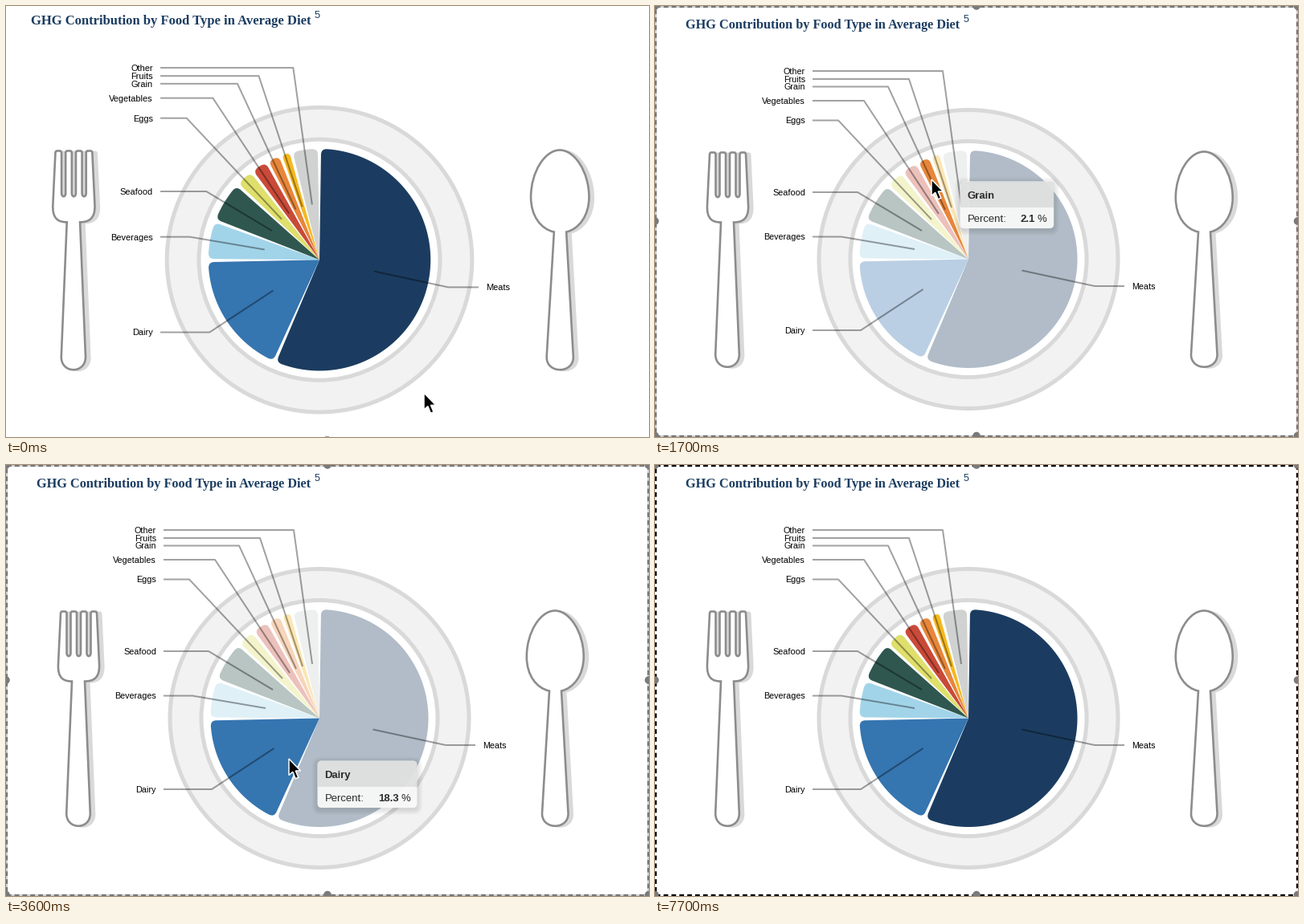
Animation of 800 by 537 pixels, one loop 7800 ms. Source, as a matplotlib script:

```python
import numpy as np
import matplotlib.pyplot as plt
from matplotlib.animation import FuncAnimation
from matplotlib.patches import Circle, FancyBboxPatch, PathPatch, Polygon, Rectangle
from matplotlib.path import Path
from matplotlib.transforms import Affine2D

W, H, DPI = 800, 537, 100
PX = 72 / DPI
FRAMES, STEP = 78, 100
ZOOM = 0.98
CX, CY, R = 390, 315.5, 135.5
GAP = 0.85
DIM = 0.34
NAVY = "#1b3c60"

# name, percent, colour, connector: label end, elbow, slice end
SLICES = [
    ("Meats", 56.6, NAVY, [(584, 349), (547, 349), (456.5, 329.5)]),
    ("Dairy", 18.3, "#3575b0", [(196, 404), (256, 404), (333.5, 353)]),
    ("Beverages", 5.8, "#a2d4e9", [(196, 287.5), (232, 287.5), (323, 303)]),
    ("Seafood", 6.1, "#2f5750", [(196, 232), (252, 232), (332, 280)]),
    ("Eggs", 2.8, "#dfdf6b", [(196, 142.5), (228, 142.5), (344, 266)]),
    ("Vegetables", 2.6, "#c94a38", [(196, 118), (260, 118), (353, 259)]),
    ("Grain", 2.1, "#e8863a", [(196, 100.5), (290, 100.5), (361, 254)]),
    ("Fruits", 1.6, "#f5b820", [(196, 91), (316, 91), (369, 251)]),
    ("Other", 4.1, "#d0d2d2", [(196, 81), (358, 81), (381, 248)]),
]
EDGES = np.concatenate([[0], np.cumsum([s[1] for s in SLICES])]) * 3.6

# pointer path: time in ms, x, y
POINTER = np.array([
    (0, 517.4, 478), (300, 500, 440), (600, 440, 300), (900, 408, 222),
    (1200, 399, 217), (1400, 378, 214), (1600, 354, 212), (1800, 334, 220),
    (2000, 313, 232), (2200, 315, 246), (2300, 296, 258), (2400, 284, 293),
    (2500, 290, 326), (2800, 310, 339), (3300, 336, 352), (3600, 352, 366),
    (4000, 332, 362), (4400, 344, 354), (4700, 357, 366), (5000, 430, 370),
    (5200, 466, 376), (5400, 535, 390), (5600, 577, 398), (5900, 466, 378),
    (6200, 440, 372), (6500, 480, 410), (6700, 550, 470), (7000, 620, 550),
    (7800, 620, 550),
])
BLACK_BORDER_FROM = 7000

fig = plt.figure(figsize=(W / DPI, H / DPI), dpi=DPI, facecolor="white")
ax = fig.add_axes([0, 0, 1, 1])
ax.axis("off")
texts = []


def shape(start, *segs):
    """Path from segments of 1 (line), 2 (quadratic) or 3 (cubic) points."""
    pts, codes = [start], [Path.MOVETO]
    kinds = {1: Path.LINETO, 2: Path.CURVE3, 3: Path.CURVE4}
    for seg in segs:
        pts += seg
        codes += [kinds[len(seg)]] * len(seg)
    return Path(pts + [start], codes + [Path.CLOSEPOLY])


def label(x, y, s, size, z=6, **kw):
    t = ax.text(x, y, s, fontsize=size * PX, va="baseline", zorder=z, **kw)
    texts.append((t, size * PX))
    return t


def polar(deg, r):
    a = np.radians(deg)
    return CX + r * np.sin(a), CY - r * np.cos(a)


def wedge(a0, a1):
    a0, a1 = a0 + GAP, a1 - GAP
    c = min(7, np.radians(a1 - a0) * R * 0.47)
    d = np.degrees(c / R)
    arc = [[polar(a, R)] for a in np.linspace(a0 + d, a1 - d, 90)]
    return shape((CX, CY), [polar(a0, R - c)], [polar(a0, R), arc[0][0]], *arc,
                 [polar(a1, R), polar(a1, R - c)])


def utensil(path):
    shadow = path.transformed(Affine2D().translate(5.5, 1))
    ax.add_patch(PathPatch(shadow, fc="#d9d9d9", ec="#d9d9d9", lw=2 * PX))
    ax.add_patch(PathPatch(path, fc="white", ec="#8c8c8c", lw=2.6 * PX))


def fork():
    segs = []
    for x in (68, 80.5, 93, 105.5):
        segs += [[(x, 182.5), (x + 2, 182.5)], [(x + 5.5, 182.5)],
                 [(x + 7.5, 182.5), (x + 7.5, 185)]]
        if x < 105:
            segs += [[(x + 7.5, 234)],
                     [(x + 7.5, 239.5), (x + 12.5, 239.5), (x + 12.5, 234)],
                     [(x + 12.5, 185)]]
    return shape((68, 185), *segs,
                 [(116, 248)], [(117, 266), (108, 269.5), (98, 269.5)],
                 [(104.8, 434)], [(105, 455), (75, 455), (75.2, 434)],
                 [(82, 269.5)], [(72, 269.5), (64, 266), (65, 248)])


def spoon():
    return shape((676, 281.5),
                 [(660, 278), (647.8, 262), (647.8, 239)],
                 [(647.8, 208), (665, 181.5), (683, 181.5)],
                 [(701, 181.5), (718.7, 208), (718.7, 239)],
                 [(718.7, 262), (706, 278), (691, 281.5)],
                 [(699.5, 434)], [(700, 455), (666.5, 455), (667, 434)])


# heading
label(38, 28, "GHG Contribution by Food Type in Average Diet", 16.3,
      family="Liberation Serif", weight="bold", color=NAVY)
label(384, 20, "5", 12.5, family="Liberation Sans", color=NAVY)

# plate and cutlery
ax.add_patch(Circle((CX, CY), 186, fc="#f2f2f2", ec="#d9d9d9", lw=5 * PX))
ax.add_patch(Circle((CX, CY), 147, fc="white", ec="#d9d9d9", lw=5 * PX))
utensil(fork())
utensil(spoon())

# pie, connectors and labels
wedges = []
for i, (name, share, color, line) in enumerate(SLICES):
    patch = PathPatch(wedge(EDGES[i], EDGES[i + 1]), fc=color, lw=0, zorder=3)
    wedges.append(ax.add_patch(patch))
    ax.plot(*zip(*line), color="black", alpha=0.37, lw=2 * PX, zorder=4,
            solid_joinstyle="round", solid_capstyle="butt")
    x, y = line[0]
    side = 1 if x > CX else -1
    label(x + 9 * side, y + 3.8, name, 10.8, family="Liberation Sans",
          ha="left" if side > 0 else "right", color="black")

# selection border
border = []
box = (0.5, 0.5), 798.5, 535
base = ax.add_patch(Rectangle(*box, fill=False, lw=2 * PX, zorder=7))
dash = ax.add_patch(Rectangle(*box, fill=False, lw=2.4 * PX, zorder=8,
                              ls=(0, (2.4, 1.7))))
border += [base, dash]
for hx in (0, 400, 799.5):
    for hy in (0, 268, 535.5):
        if (hx, hy) != (400, 268):
            border.append(ax.add_patch(
                Circle((hx, hy), 4.8, fc="#7a7a7a", lw=0, zorder=9)))
mark = ax.add_patch(Rectangle((396.8, 530.4), 5, 1.3, fc="#9a9a9a", lw=0))

# tooltip
tip_shift = Affine2D()
tip_move = tip_shift + ax.transData
tip = []


def rounded(x, y, w, h, r, z, **kw):
    p = FancyBboxPatch((x, y), w, h, boxstyle=f"round,pad=0,rounding_size={r}",
                       lw=0, zorder=z, transform=tip_move, **kw)
    tip.append(ax.add_patch(p))
    return p


def tip_text(x, y, **kw):
    t = label(x, y, "", 13.1, z=13, family="Liberation Sans", color="#2b2b2b", **kw)
    t.set_transform(tip_move)
    tip.append(t)
    return t


shadows = [rounded(-g, 2 - g, 124 + 2 * g, 58.5 + 2 * g, 5 + g, 10,
                   fc="black", alpha=0.016) for g in range(1, 8)]
body = rounded(0, 0, 124, 58.5, 5, 11, fc="#fafafa", alpha=0.95)
head = Rectangle((0, 0), 124, 32, fc="black", alpha=0.09, lw=0, zorder=12,
                 transform=tip_move)
ax.add_patch(head)
head.set_clip_path(body)
tip.append(head)
tip_name = tip_text(9, 21.5, weight="bold")
tip_key = tip_text(9, 50.5)
tip_key.set_text("Percent:")
tip_value = tip_text(101, 50.5, weight="bold", ha="right")
tip_unit = tip_text(115.5, 50.5, ha="right")
tip_unit.set_text("%")

# pointer
ptr_shift = Affine2D()
pointer = ax.add_patch(Polygon(
    [(0, 0), (0, 20.5), (4.7, 16.3), (8.2, 24.8), (11.8, 23.3), (8.3, 15), (14.5, 15)],
    fc="black", ec="white", lw=1.5 * PX, zorder=15,
    transform=ptr_shift + ax.transData))


def hit(x, y):
    """Index of the slice under a point, or None."""
    if np.hypot(x - CX, y - CY) > R:
        return None
    a = np.degrees(np.arctan2(x - CX, CY - y)) % 360
    i = int(np.searchsorted(EDGES, a, side="right")) - 1
    i = min(i, len(SLICES) - 1)
    return i if EDGES[i] + GAP < a < EDGES[i + 1] - GAP else None


def set_view(zoomed):
    """Opening view is slightly closer and has no selection border."""
    k = ZOOM if zoomed else 1
    x0, y0 = (CX * (1 - ZOOM), 5.6) if zoomed else (0, 0)
    ax.set_xlim(x0, x0 + W * k)
    ax.set_ylim(y0 + H * k, y0)
    for t, size in texts:
        t.set_fontsize(size / k)
    for p in border:
        p.set_visible(not zoomed)
    mark.set_visible(zoomed)


def show_tip(i, x, y):
    for a in tip:
        a.set_visible(i is not None)
    if i is None:
        return
    name, share = SLICES[i][:2]
    narrow = 0 if share >= 10 else 7.3
    tip_shift.clear().translate(x + 35.5, y + 2.5)
    for g, p in enumerate(shadows, 1):
        p.set_width(124 - narrow + 2 * g)
    body.set_width(124 - narrow)
    tip_name.set_text(name)
    tip_value.set_text(f"{share:.1f}")
    tip_value.set_x(101 - narrow)
    tip_unit.set_x(115.5 - narrow)


def draw(n):
    ms = n * STEP
    set_view(n == 0)
    x, y = (np.interp(ms, POINTER[:, 0], POINTER[:, k]) for k in (1, 2))
    ptr_shift.clear().translate(x, y)
    over = hit(x, y)
    for i, p in enumerate(wedges):
        p.set_alpha(1 if over in (None, i) else DIM)
    show_tip(over, x, y)
    black = ms >= BLACK_BORDER_FROM
    base.set_edgecolor("white" if black else "#cfcfcf")
    dash.set_edgecolor("black" if black else "#777777")
    return []


anim = FuncAnimation(fig, draw, frames=FRAMES, interval=STEP, repeat=True,
                     repeat_delay=0, init_func=lambda: [])
plt.show()
```
